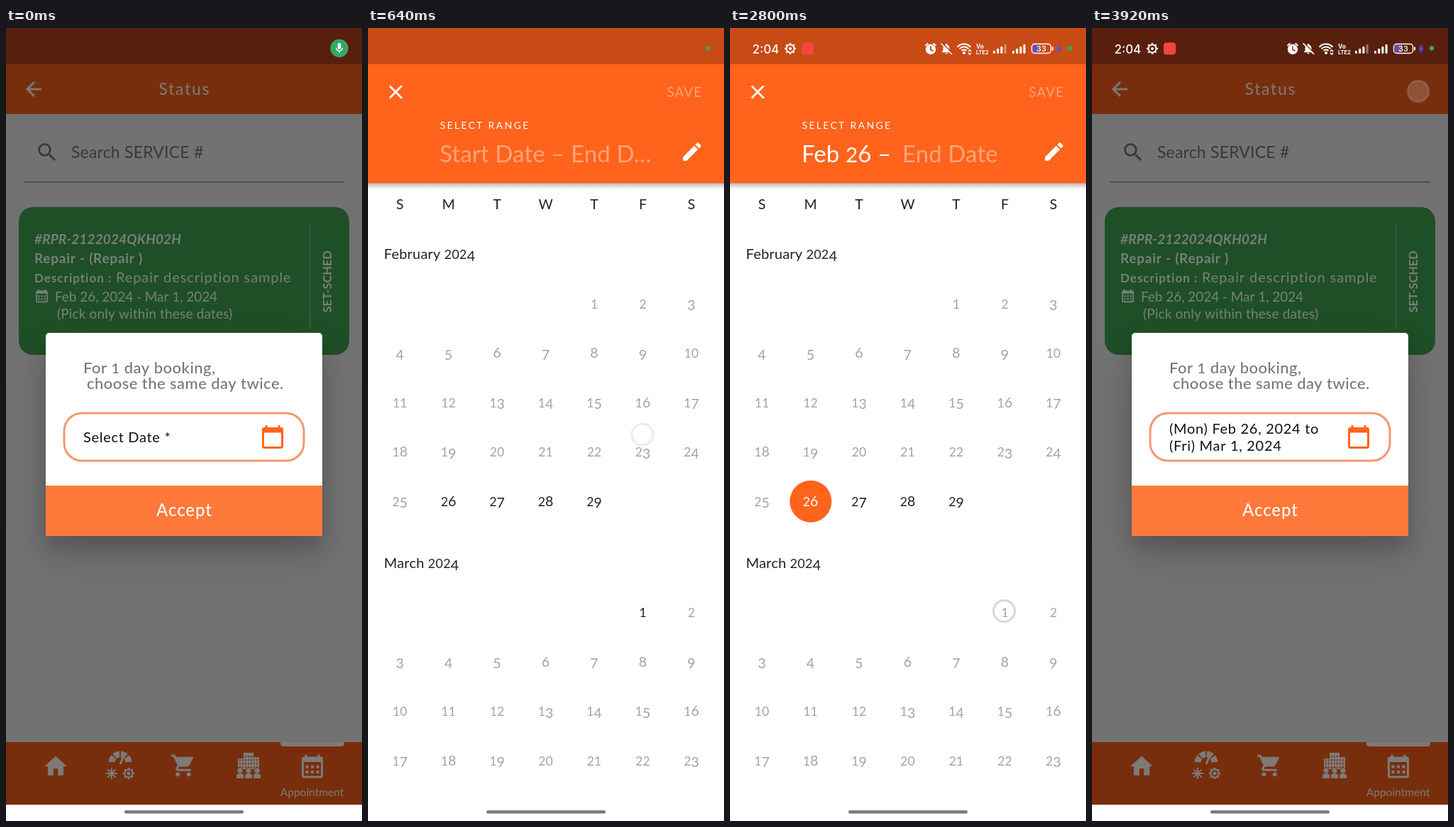
Recreate the animation shown at these times as an HTML page with a canvas. Size 502 px wide and 1116 px high, loop 4000 ms.

```html
<!DOCTYPE html>
<html lang="en">
<head>
<meta charset="utf-8">
<title>Date range booking</title>
<style>
html, body { margin: 0; width: 100%; height: 100%; overflow: hidden; background: #fff; }
canvas { display: block; width: 502px; height: 1116px; }
</style>
</head>
<body>
<canvas id="stage"></canvas>
<script>
const W = 502, H = 1116, LOOP = 4000, STEP = 80;
const ORANGE = '#ff631c', BAR = '#782e0c', LIGHT = '#7e7a78', CARD_TEXT = '#788079';
const dpr = window.devicePixelRatio || 1;
const stage = document.getElementById('stage');
const layer = document.createElement('canvas');
for (const c of [stage, layer]) {
  c.width = W * dpr;
  c.height = H * dpr;
  c.getContext('2d').scale(dpr, dpr);
}
const main = stage.getContext('2d');
const over = layer.getContext('2d');
let g = main;

const ICONS = {
  home: 'M10 20v-6h4v6h5v-8h3L12 3 2 12h3v8z',
  cart: 'M7 18c-1.1 0-1.99.9-1.99 2S5.9 22 7 22s2-.9 2-2-.9-2-2-2zM1 2v2h2l3.6 7.59-1.35 2.45c-.16.28-.25.61-.25.96 0 1.1.9 2 2 2h12v-2H7.42c-.14 0-.25-.11-.25-.25l.03-.12.9-1.63h7.45c.75 0 1.41-.41 1.75-1.03l3.58-6.49A1 1 0 0 0 20 4H5.21l-.94-2H1zm16 16c-1.1 0-1.99.9-1.99 2s.89 2 1.99 2 2-.9 2-2-.9-2-2-2z',
  calendar: 'M20 3h-1V1h-2v2H7V1H5v2H4c-1.1 0-2 .9-2 2v16c0 1.1.9 2 2 2h16c1.1 0 2-.9 2-2V5c0-1.1-.9-2-2-2zm0 18H4V8h16v13z',
  back: 'M20 11H7.83l5.59-5.59L12 4l-8 8 8 8 1.41-1.41L7.83 13H20v-2z',
  close: 'M19 6.41L17.59 5 12 10.59 6.41 5 5 6.41 10.59 12 5 17.59 6.41 19 12 13.41 17.59 19 19 17.59 13.41 12z',
  search: 'M15.5 14h-.79l-.28-.27C15.41 12.59 16 11.11 16 9.5 16 5.91 13.09 3 9.5 3S3 5.91 3 9.5 5.91 16 9.5 16c1.61 0 3.09-.59 4.23-1.57l.27.28v.79l5 4.99L20.49 19l-4.99-5zm-6 0C7.01 14 5 11.99 5 9.5S7.01 5 9.5 5 14 7.01 14 9.5 11.99 14 9.5 14z',
  edit: 'M3 17.25V21h3.75L17.81 9.94l-3.75-3.75L3 17.25zM20.71 7.04c.39-.39.39-1.02 0-1.41l-2.34-2.34c-.39-.39-1.02-.39-1.41 0l-1.83 1.83 3.75 3.75 1.83-1.83z',
  mic: 'M12 14c1.66 0 3-1.34 3-3V5c0-1.66-1.34-3-3-3S9 3.34 9 5v6c0 1.66 1.34 3 3 3zm5-3c0 2.76-2.24 5-5 5s-5-2.24-5-5H5c0 3.53 2.61 6.43 6 6.92V21h2v-3.08c3.39-.49 6-3.39 6-6.92h-2z',
  bolt: 'M11 21h-1l1-7H7.5c-.58 0-.57-.32-.38-.66l.19-.34L13 3h1l-1 7h3.5c.49 0 .56.33.47.51L11 21z',
  bell: 'M12 22c1.1 0 2-.9 2-2h-4c0 1.1.9 2 2 2zm6-6v-5c0-3.07-1.63-5.64-4.5-6.32V4c0-.83-.67-1.5-1.5-1.5s-1.5.67-1.5 1.5v.68C7.64 5.36 6 7.92 6 11v5l-2 2v1h16v-1l-2-2z'
};
for (const k in ICONS) ICONS[k] = new Path2D(ICONS[k]);

const clamp = v => Math.max(0, Math.min(1, v));
const easeOut = v => 1 - Math.pow(1 - clamp(v), 1.75);

function icon(name, x, y, size, color) {
  g.save();
  g.translate(x - size / 2, y - size / 2);
  g.scale(size / 24, size / 24);
  g.fillStyle = color;
  g.fill(ICONS[name]);
  g.restore();
}
function rect(x, y, w, h, color, r = 0) {
  g.fillStyle = color;
  g.beginPath();
  g.roundRect(x, y, w, h, r);
  g.fill();
}
function disc(x, y, r, color) {
  g.fillStyle = color;
  g.beginPath();
  g.arc(x, y, r, 0, 7);
  g.fill();
}
function ring(x, y, r, color, width, from = 0, to = Math.PI * 2) {
  g.strokeStyle = color;
  g.lineWidth = width;
  g.beginPath();
  g.arc(x, y, r, from, to);
  g.stroke();
}
function line(color, width, ...p) {
  g.strokeStyle = color;
  g.lineWidth = width;
  g.beginPath();
  for (let i = 0; i < p.length; i += 2) g.lineTo(p[i], p[i + 1]);
  g.stroke();
}

// "old" sets hanging figures: 0-2 a little smaller, 3 4 5 7 9 below the baseline
function text(str, x, y, size, color, o = {}) {
  const runs = o.old ? str.match(/[0-2]+|[34579]+|[^0-234579]+/g) : [str];
  const setFont = run => {
    const k = o.old && /^[0-2]/.test(run) ? 0.9 : 1;
    g.font = `${o.style || ''} ${o.weight || 400} ${size * k}px ${o.family || 'Lato, sans-serif'}`;
    g.letterSpacing = (o.gap || 0) + 'px';
  };
  if (o.center) {
    let total = -(o.gap || 0);
    for (const run of runs) { setFont(run); total += g.measureText(run).width; }
    x -= total / 2;
  }
  g.fillStyle = color;
  g.textAlign = 'left';
  for (const run of runs) {
    setFont(run);
    g.fillText(run, x, y + (o.old && /^[34579]/.test(run) ? size * 0.13 : 0));
    x += g.measureText(run).width;
  }
}

function dottedCalendar(x, y, size, color) {
  icon('calendar', x, y, size, color);
  const u = size / 24;
  for (let i = 0; i < 6; i++)
    rect(x + (i % 3 - 1) * 5 * u - 1.4 * u, y + (i < 3 ? -1 : 4) * u, 2.8 * u, 2.8 * u, color);
}

function gaugeIcon() {
  for (let i = 0; i < 4; i++) {
    const a = Math.PI * (1 + i / 4);
    ring(161, 1034, 12, LIGHT, 9, a + 0.07, a + Math.PI / 4 - 0.07);
  }
  line(LIGHT, 3, 161, 1036, 166, 1024);
  for (let i = 0; i < 4; i++) {
    const a = i * Math.PI / 4, c = Math.cos(a) * 8, s = Math.sin(a) * 8;
    line(LIGHT, 2, 149 - c, 1049 - s, 149 + c, 1049 + s);
    line(LIGHT, 3, 173 - c, 1049 - s, 173 + c, 1049 + s);
  }
  disc(173, 1049, 6.5, LIGHT);
  ring(173, 1049, 3.5, BAR, 2);
}

function townIcon() {
  rect(327, 1028, 9, 15, LIGHT);
  rect(335, 1020, 14, 23, LIGHT);
  rect(348, 1026, 9, 17, LIGHT);
  for (let x = 329; x < 356; x += 4)
    for (let y = 1024; y < 1040; y += 5) rect(x, y, 1.6, 2.4, BAR);
  for (let i = 0; i < 3; i++) {
    const x = 330 + i * 12;
    disc(x, 1045, 4.5, BAR);
    disc(x, 1045, 3.6, LIGHT);
    rect(x - 5, 1049, 10, 7, LIGHT, [4, 4, 0, 0]);
  }
}

function drawHome(picked) {
  rect(0, 0, W, H, '#727272');
  rect(0, 0, W, 51, '#581f0c');
  rect(0, 51, W, 70, BAR);
  icon('back', 39, 86, 33, LIGHT);
  text('Status', 251, 94, 23, LIGHT, { gap: 1.7, center: true });
  icon('search', 58, 175, 34, '#393939');
  text('Search SERVICE #', 92, 183, 23, '#393939', { gap: 0.2 });
  rect(25, 216, 452, 1.5, '#444');

  rect(18, 252, 466, 208, '#1f4f27', 20);
  text('#RPR-2122024QKH02H', 40, 304, 19, CARD_TEXT, { weight: 700, style: 'italic', gap: 0.15 });
  text('Repair - (Repair )', 40, 331, 19, CARD_TEXT, { weight: 700, gap: 0.75 });
  text('Description :', 40, 358, 17, CARD_TEXT, { weight: 700, gap: 1 });
  text('Repair description sample', 155, 358, 20, CARD_TEXT, { gap: 0.9 });
  dottedCalendar(50.5, 377, 20, CARD_TEXT);
  text('Feb 26, 2024 - Mar 1, 2024', 69, 385, 19, CARD_TEXT, { gap: -0.05 });
  text('(Pick only within these dates)', 72, 409, 19, CARD_TEXT, { gap: 0.17 });
  rect(428, 274, 1.5, 150, '#3a5f41');
  g.save();
  g.translate(459, 357);
  g.rotate(-Math.PI / 2);
  text('SET-SCHED', 0, 0, 16.3, CARD_TEXT, { weight: 700, center: true });
  g.restore();

  rect(0, 1005, W, 88, BAR);
  icon('home', 70, 1039, 38, LIGHT);
  gaugeIcon();
  icon('cart', 250, 1038, 37, LIGHT);
  townIcon();
  rect(387, 1005, 90, 6, LIGHT, [0, 0, 4, 4]);
  dottedCalendar(432, 1039, 36, LIGHT);
  text('Appointment', 431.5, 1081, 15.5, LIGHT, { center: true });
  drawDialog(picked);
}

function drawDialog(picked) {
  for (const [blur, dy, alpha] of [[60, 28, 0.14], [26, 16, 0.15]]) {
    g.save();
    g.shadowColor = `rgba(0,0,0,${alpha})`;
    g.shadowBlur = blur * dpr;
    g.shadowOffsetY = dy * dpr;
    rect(56, 430, 390, 285, '#fff', 5);
    g.restore();
  }
  rect(56, 429, 390, 215, '#fff', [5, 5, 0, 0]);
  rect(56, 644, 390, 71, '#ff793a');
  text('For 1 day booking,', 109, 486, 22, '#777', { gap: 0.5, weight: 500, old: true });
  text('choose the same day twice.', 114, 508, 22, '#777', { gap: 0.45, weight: 500 });
  g.strokeStyle = '#f3996f';
  g.lineWidth = 3;
  g.beginPath();
  g.roundRect(82, 542, 338, 67, 25);
  g.stroke();
  if (picked) {
    text('(Mon) Feb 26, 2024 to', 109, 571, 20, '#111', { gap: 0.7 });
    text('(Fri) Mar 1, 2024', 109, 595, 20, '#111', { gap: 0.7 });
  } else {
    text('Select Date *', 109, 583, 20, '#111', { gap: 0.7 });
  }
  icon('calendar', 376, 575.5, 36, ORANGE);
  text('Accept', 251, 687, 24, '#fff', { gap: 0.9, weight: 500, center: true });
}

const dayX = i => 45 + 68.5 * i;

function drawMonth(firstDay, count, top, isOpen, isPicked) {
  for (let d = 1; d <= count; d++) {
    const cell = firstDay + d - 1, x = dayX(cell % 7);
    const y = top + 69.55 * Math.floor(cell / 7);
    if (isPicked(d)) disc(x + 0.3, y, 29.5, ORANGE);
    const color = isPicked(d) ? '#fff' : isOpen(d) ? '#222' : '#a3a3a3';
    text(String(d), x, y + 6.5, 19.5, color, { center: true, old: true });
  }
}

function drawPicker(t) {
  const start = t >= 2160, end = t >= 2960;
  const faint = 'rgba(255,255,255,.42)';
  rect(0, 0, W, 1093, '#fff');
  const fade = g.createLinearGradient(0, 218, 0, 227);
  fade.addColorStop(0, 'rgba(0,0,0,.27)');
  fade.addColorStop(1, 'rgba(0,0,0,0)');
  rect(0, 218, W, 9, fade);
  rect(0, 0, W, 51, '#c84b16');
  rect(0, 51, W, 167.5, ORANGE);
  if (t >= 3680) rect(403, 52, 87, 77, 'rgba(255,255,255,.05)');
  icon('close', 39, 90, 33, '#fff');
  text('SAVE', 421.5, 97, 18.5, end ? '#fff' : faint, { gap: 1.4 });
  text('SELECT RANGE', 101.5, 142, 14, '#fff', { gap: 2.3 });
  const big = { gap: 0.1, old: true };
  if (!start) {
    text('Start Date – End D…', 101, 189, 33, faint, big);
  } else {
    text('Feb 26 –', 101, 189, 33, '#fff', big);
    text(end ? 'Mar 1' : 'End Date', 243, 189, 33, end ? '#fff' : faint, big);
  }
  icon('edit', 457, 174, 34, '#fff');

  [...'SMTWTFS'].forEach((c, i) => text(c, dayX(i), 255, 19.5, '#222', { center: true }));
  text('February 2024', 22.5, 325, 20, '#222', { gap: 0.2, old: true });
  text('March 2024', 22.5, 760, 20, '#222', { gap: 0.2, old: true });
  if (end) {
    rect(114, 636.5, 240, 59, '#ffe8e1');
    rect(354, 793, 34, 58.5, '#ffe8e1');
  }
  drawMonth(4, 29, 388, d => d >= 26, d => start && d === 26);
  drawMonth(5, 23, 822.5, d => d === 1, d => end && d === 1);
}

function drawSignal(x) {
  for (let i = 0; i < 4; i++) {
    const h = 4 + i * 3;
    rect(x + i * 5.2, 36 - h, 3, h, x < 380 && i === 3 ? 'rgba(255,255,255,.4)' : '#fff', 1);
  }
}

function drawStatusIcons(alpha) {
  const white = '#fff', ui = { family: 'Inter, sans-serif', weight: 500 };
  g.save();
  g.globalAlpha = alpha;
  text('2:04', 31.5, 35.5, 17, white, ui);
  ring(85, 29, 5.5, white, 2);
  for (let i = 0; i < 8; i++) {
    const a = i * Math.PI / 4, c = Math.cos(a), s = Math.sin(a);
    line(white, 2.2, 85 + c * 5.5, 29 + s * 5.5, 85 + c * 8, 29 + s * 8);
  }
  disc(85, 29, 2, white);
  rect(101, 20.5, 17, 17, '#f2463f', 4);

  disc(283, 30, 7.2, white);
  line('#9c3c14', 1.6, 283, 25.5, 283, 30.5, 286.5, 32.5);
  line(white, 2, 275.5, 25, 279.5, 21.5);
  line(white, 2, 290.5, 25, 286.5, 21.5);
  icon('bell', 305, 29, 18, white);
  line('#8b3512', 1.5, 299, 21, 314, 36);
  line(white, 1.6, 297.5, 21.5, 313, 37);
  for (const r of [4.5, 8.5, 12.5]) ring(330, 35, r, white, 2.2, -Math.PI * 0.77, -Math.PI * 0.23);
  disc(330, 35, 2, white);
  line(white, 1.6, 336, 33, 338, 31, 340, 33);
  line(white, 1.6, 336, 35, 338, 37, 340, 35);
  text('Vo', 347, 28.5, 8.5, white, { ...ui, weight: 700 });
  text('LTE2', 347, 36.5, 7.5, white, { ...ui, weight: 700 });
  drawSignal(371);
  drawSignal(398);
  rect(427, 23.5, 10, 11, '#6a4ea8', 3);
  g.strokeStyle = white;
  g.lineWidth = 1.4;
  g.beginPath();
  g.roundRect(425.5, 22.5, 27, 13, 4);
  g.stroke();
  rect(454, 26.5, 2, 5, white, 1);
  text('33', 439, 33, 11, white, { ...ui, center: true });
  icon('bolt', 464, 29, 17, '#4b50f0');
  g.restore();
}

function drawMic(t) {
  const k = clamp((t - 40) / 360);
  disc(470 + 9 * k, 28.5, 12.7 - 9.5 * k, '#34a862');
  if (k < 0.4) icon('mic', 470 + 9 * k, 28.5, 18 * (1 - k), '#fff');
}

// x, y, press, release, gone
const TOUCHES = [
  [387, 572, 240, 600, 680],
  [116.5, 659.5, 2000, 2160, 2320],
  [386.5, 820.5, 2800, 2960, 3120],
  [460, 89, 3680, 3760, 3990]
];
function drawTouches(t) {
  for (const [x, y, press, release, gone] of TOUCHES) {
    if (t < press || t >= gone) continue;
    g.save();
    g.globalAlpha = clamp((gone - t) / (gone - release));
    disc(x, y, 15, 'rgba(255,255,255,.58)');
    ring(x, y, 15, 'rgba(190,190,190,.6)', 3);
    g.restore();
  }
}

function draw(t) {
  g = main;
  drawHome(t >= 2960);
  const alpha = t < 2960 ? easeOut((t - 480) / 150) : easeOut(1 - (t - 3740) / 150);
  if (alpha > 0) {
    const dim = 0.54 * (1 - Math.pow(1 - alpha, 1.6));
    rect(0, 0, W, 1093, `rgba(0,0,0,${dim})`);
    g = over;
    g.clearRect(0, 0, W, H);
    drawPicker(t);
    g = main;
    g.globalAlpha = alpha;
    g.drawImage(layer, 0, 0, W, H);
    g.globalAlpha = 1;
  }
  rect(0, 1093, W, 23, '#fff');
  rect(167, 1101, 168, 4.5, '#7b7b7b', 2.2);
  drawStatusIcons(clamp((t - 640) / 400));
  drawMic(t);
  drawTouches(t);
}

const began = performance.now();
function tick() {
  const t = (performance.now() - began) % LOOP;
  draw(Math.floor(t / STEP) * STEP);
  requestAnimationFrame(tick);
}
tick();
</script>
</body>
</html>
```
